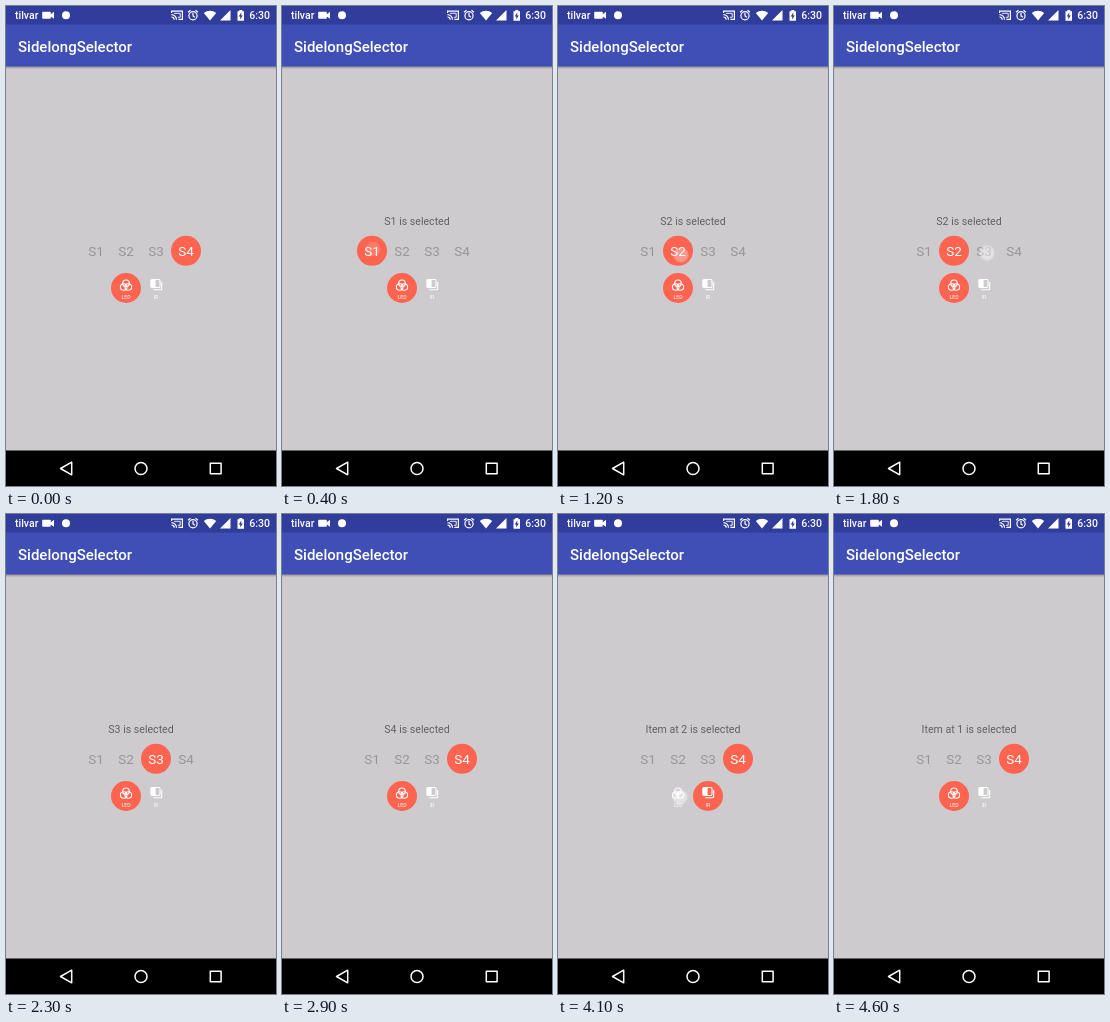
An HTML page that plays this animation: 270 px wide and 480 px high, repeating every 4.7 s.

```html
<!DOCTYPE html>
<html lang="en">
<head>
<meta charset="utf-8">
<title>Picker demo</title>
<style>
  html, body { margin: 0; width: 100%; height: 100%; overflow: hidden; background: #cdcbcd; }
  svg { display: block; width: 270px; height: 480px; font-family: Roboto, sans-serif; }
  .medium { font-weight: 500; fill: #fff; }
  .middle { text-anchor: middle; }
  .item { font-size: 13.5px; fill: #989698; }
  .item.on { fill: #fff; }
  .caption { font-size: 5.2px; fill: #fff; }
  .disc { fill: #ff6450; }
  .line { fill: none; stroke: #fff; }
</style>
</head>
<body>
<svg viewBox="0 0 270 480">
  <defs>
    <linearGradient id="shade" x2="0" y2="1">
      <stop stop-color="#000" stop-opacity=".3"/>
      <stop offset="1" stop-color="#000" stop-opacity="0"/>
    </linearGradient>
    <radialGradient id="spot">
      <stop offset=".75" stop-color="#fff"/>
      <stop offset="1" stop-color="#fff" stop-opacity=".5"/>
    </radialGradient>
  </defs>

  <rect width="270" height="480" fill="#cdcbcd"/>
  <rect y="60" width="270" height="3.5" fill="url(#shade)"/>
  <rect width="270" height="60.5" fill="#3f4fb5"/>
  <rect width="270" height="18.5" fill="#303d9b"/>
  <text class="medium" x="12" y="46" font-size="15">SidelongSelector</text>

  <!-- status bar -->
  <g class="medium" font-size="10.5">
    <text x="9" y="13.2">tilvar</text>
    <text x="264" y="13.2" text-anchor="end">6:30</text>
    <path d="M37 5.8h7q.8 0 .8.8v1.6l3.2-2.4v7l-3.2-2.4v1.6q0 .8-.8.8h-7q-.8 0-.8-.8v-5.400q0-.8.8-.8z"/>
    <circle cx="60" cy="9.300" r="4"/>
    <path d="M204 14.600 197.800 7a9.500 9.500 0 0 1 12.400 0z"/>
    <path d="M224.500 4v10.500h-10.500z"/>
    <path d="M233.300 4h3v1.200h1.700v9.500h-6.500v-9.500h1.800z"/>
    <path d="M235.300 6.600v2.800h1.500l-2.600 4v-3h-1.500z" fill="#303d9b"/>
  </g>
  <g class="line" stroke-width="1.2">
    <path d="M165.600 7v-1.900h10.800v8.300h-4M165.500 8.700a5 5 0 0 1 5 5M165.500 11a2.700 2.700 0 0 1 2.700 2.700"/>
    <path d="M168 7.300h6.200v4h-2.300" stroke-width=".9"/>
    <circle cx="187" cy="9.800" r="4.100"/>
    <path d="M187 7v3l1.900 1.200M182 6.300l2.500-2M192 6.300l-2.500-2"/>
  </g>

  <!-- content -->
  <text id="message" class="middle" x="135" y="219.200" font-size="10.6" fill="#626063"></text>
  <circle id="topDisc" class="disc" cy="244.800" r="15"/>
  <g id="items"></g>
  <circle id="lowDisc" class="disc" cy="282" r="15"/>
  <g class="line" stroke-width="1.1">
    <circle cx="120" cy="277.300" r="3.300"/>
    <circle cx="117.700" cy="281" r="3.300"/>
    <circle cx="122.300" cy="281" r="3.300"/>
    <rect x="144.800" y="273.500" width="9.200" height="8" rx="1.200"/>
    <path d="M147.200 283.700h7.200q1.300 0 1.300-1.300v-6.400"/>
    <path d="M145 274h4.600v7.300h-4.600z" fill="#fff" stroke="none"/>
  </g>
  <text class="caption middle" x="120" y="293.300">LED</text>
  <text class="caption middle" x="150" y="293.300">IR</text>
  <circle id="touch" r="7.800" fill="url(#spot)"/>

  <!-- navigation bar -->
  <rect y="444.500" width="270" height="35.500"/>
  <g class="line" stroke-width="1.500" stroke-linejoin="round">
    <path d="M54.500 462.500l11.200-6.300v12.600z"/>
    <circle cx="135" cy="462.500" r="6"/>
    <rect x="204.300" y="457.200" width="10.800" height="10.600"/>
  </g>
</svg>

<script>
  const LOOP = 4700, STEP = 100;
  const $ = id => document.getElementById(id);
  const columnX = i => 90 + 30 * i;

  // Each tap selects on release; its spot then fades until "gone".
  const taps = [
    { down: 100,  up: 200,  gone: 500,  x: 91,  y: 243, top: 0 },
    { down: 700,  up: 1100, gone: 1500, x: 123, y: 249, top: 1 },
    { down: 1700, up: 1900, gone: 2200, x: 153, y: 247, top: 2 },
    { down: 2600, up: 2700, gone: 2900, x: 182, y: 248, top: 3 },
    { down: 3200, up: 3300, gone: 3800, x: 158, y: 281, low: 1 },
    { down: 4100, up: 4300, gone: 4600, x: 122, y: 283, low: 0 }
  ];

  const items = [0, 1, 2, 3].map(i => {
    const text = document.createElementNS("http://www.w3.org/2000/svg", "text");
    text.setAttribute("x", columnX(i));
    text.setAttribute("y", 249.8);
    text.setAttribute("class", "item middle");
    text.textContent = "S" + (i + 1);
    return $("items").appendChild(text);
  });

  function draw(t) {
    let top = 3, low = 0, message = "", alpha = 0;
    for (const tap of taps) {
      if (t >= tap.up) {
        if ("top" in tap) {
          top = tap.top;
          message = `S${top + 1} is selected`;
        } else {
          low = tap.low;
          message = `Item at ${low + 1} is selected`;
        }
      }
      if (t >= tap.down && t < tap.gone) {
        alpha = 0.45 * Math.min(1, (tap.gone - t) / (tap.gone - tap.up));
        $("touch").setAttribute("cx", tap.x);
        $("touch").setAttribute("cy", tap.y);
      }
    }
    $("message").textContent = message;
    $("topDisc").setAttribute("cx", columnX(top));
    $("lowDisc").setAttribute("cx", columnX(low + 1));
    $("touch").setAttribute("opacity", alpha);
    items.forEach((item, i) => item.classList.toggle("on", i === top));
  }

  const start = performance.now();
  function tick() {
    const t = (performance.now() - start) % LOOP;
    draw(Math.floor(t / STEP) * STEP);
    requestAnimationFrame(tick);
  }
  tick();
</script>
</body>
</html>
```
